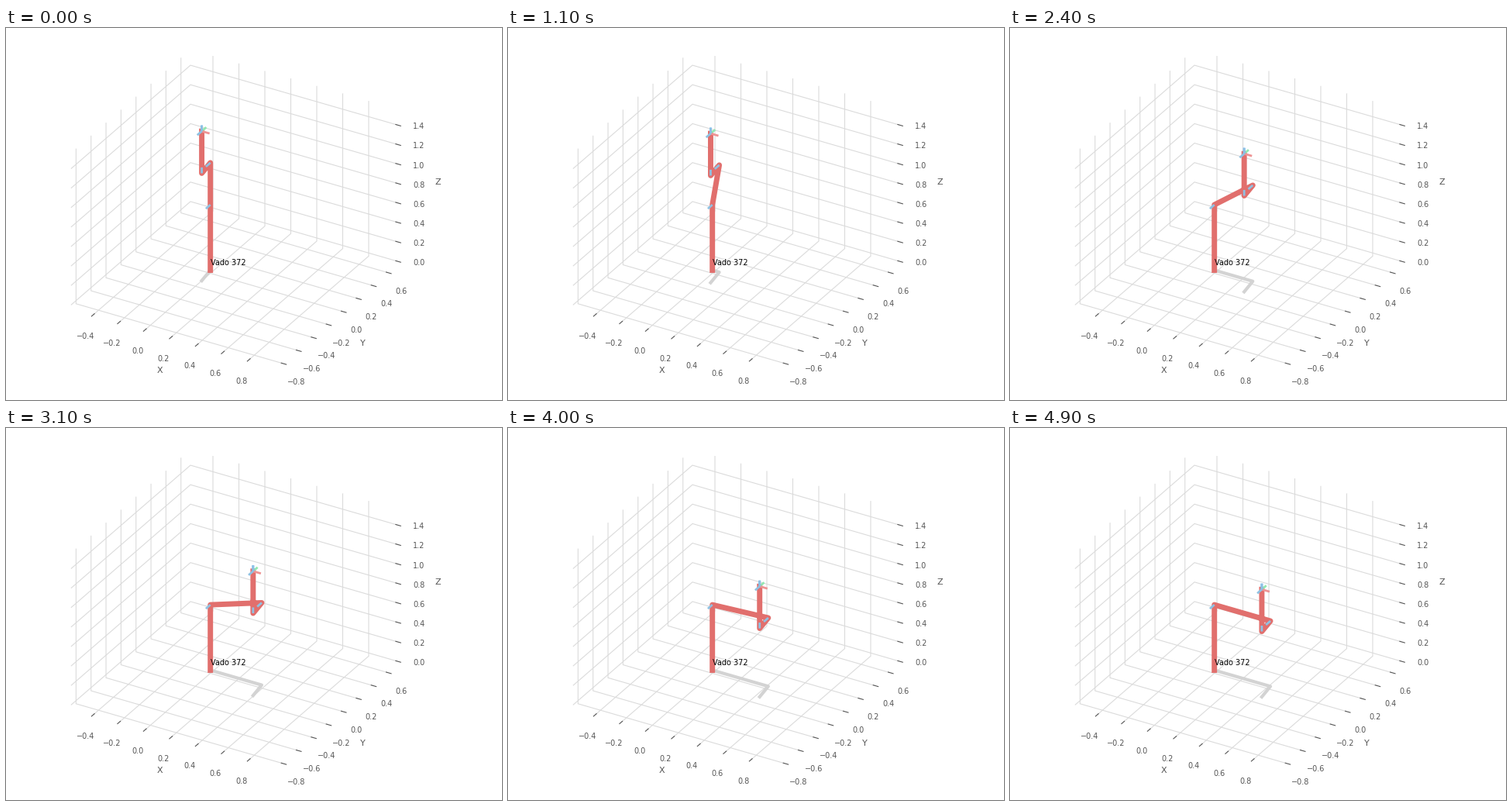
A matplotlib script that plays this animation: 640x480 px, repeating every 5000 ms.

```python
import numpy as np
import matplotlib.pyplot as plt
from matplotlib.animation import FuncAnimation

WIDTH, HEIGHT, DPI = 640, 480, 100
FRAMES, INTERVAL = 50, 100

# Orthographic view at elevation 30, azimuth -60; box aspect 4:4:3
SCALE = 193.4
ORIGIN = np.array([263.7, 312.5])
SIN60 = np.sqrt(3) / 2
VIEW = SCALE * np.array([[SIN60, 0.25], [0.5, -SIN60 / 2], [0, -0.75 * SIN60]])

# Edges of the panes
X0, X1 = -0.573, 1.021
Y0, Y1 = -0.867, 0.727
Z0, Z1 = -0.032, 1.562
TICK_IN, TICK_OUT = 0.0128, 0.0255
LABEL_GAP = 0.1045  # outward, in world units
LABEL_DROP = 8.9  # from the label's anchor to its baseline, in pixels

X_TICKS = np.arange(-2, 5) / 5
Y_TICKS = np.arange(-4, 4) / 5
Z_TICKS = np.arange(0, 8) / 5

# Arm dimensions
D1, A2, D3, A3, D4 = 0.6718, 0.4318, 0.15005, 0.0203, 0.4318
AXIS_LENGTH = 0.06

GREY, GRID = "#555555", "#dbdbdb"
ARM, SHADOW, JOINT = "#E16F6D", "lightgrey", "#8FC1E2"
RED, GREEN, BLUE = "#EE9494", "#93E7B0", "#54AEFF"

plt.rcParams["font.family"] = "DejaVu Sans"
plt.rcParams["font.size"] = 7
fig = plt.figure(figsize=(WIDTH / DPI, HEIGHT / DPI), dpi=DPI, facecolor="white")
ax = fig.add_axes([0, 0, 1, 1])
ax.set_xlim(0, WIDTH)
ax.set_ylim(HEIGHT, 0)
ax.axis("off")


def project(points):
    return ORIGIN + np.asarray(points, float) @ VIEW


def polyline(points, color, width, zorder, **style):
    x, y = project(points).T
    return ax.plot(x, y, color=color, lw=width, zorder=zorder, snap=False, **style)[0]


def centred_text(x, baseline, text, size=7):
    ax.text(x, baseline, text, ha="center", va="baseline", color=GREY, fontsize=size)


def tick_label(edge, outward, value):
    x, y = project(np.array(edge) + LABEL_GAP * np.array(outward))
    centred_text(x, y + LABEL_DROP, f"{value:.1f}".replace("-", "\u2212"))


def grid_line(points):
    polyline(points, GRID, 0.8, 0, solid_capstyle="butt")


def tick_mark(start, end):
    polyline([start, end], GREY, 0.8, 1)


def draw_axes():
    for x in X_TICKS:
        grid_line([(x, Y0, Z0), (x, Y1, Z0), (x, Y1, Z1)])
        tick_mark((x, Y0 - TICK_OUT, Z0), (x, Y0 + TICK_IN, Z0))
        tick_label((x, Y0, Z0), (0, -1, -1), x)
    for y in Y_TICKS:
        grid_line([(X1, y, Z0), (X0, y, Z0), (X0, y, Z1)])
        tick_mark((X1 - TICK_IN, y, Z0), (X1 + TICK_OUT, y, Z0))
        tick_label((X1, y, Z0), (1, 0, -1), y)
    for z in Z_TICKS:
        grid_line([(X0, Y0, z), (X0, Y1, z), (X1, Y1, z)])
        tick_mark((X1 - TICK_IN, Y1, z), (X1 + TICK_OUT, Y1, z))
        tick_label((X1, Y1, z), (1, 1, 0), z)
    centred_text(198.5, 445, "X", 8)
    centred_text(460.5, 410.3, "Y", 8)
    centred_text(557.8, 202, "Z", 8)


def arm_points(angle):
    shoulder = np.array([0, 0, D1])
    elbow = shoulder + A2 * np.array([np.cos(angle), 0, np.sin(angle)])
    forearm = elbow + [A3, -D3, 0]
    wrist = forearm + [0, 0, D4]
    return np.array([np.zeros(3), shoulder, elbow, forearm, wrist])


draw_axes()
start = arm_points(np.pi / 2)
shadow = polyline(start * [1, 1, 0], SHADOW, 3, 2)
arm = polyline(start, ARM, 5, 3)
ax.text(*project((0, 0, 0.05)), "Vado 372", color="black", zorder=4)

# Each short axis: index of its arm point, direction, colour
AXES = [
    (1, (0, -1, 0), JOINT),
    (2, (0, -1, 0), JOINT),
    (3, (0, 0, 1), JOINT),
    (4, (0, 1, 0), GREEN),
    (4, (1, 0, 0), RED),
    (4, (0, 0, 1), BLUE),
    (4, (0, 0, 1), JOINT),
    (4, (0, -1, 0), JOINT),
]
arrows = [
    polyline(np.zeros((2, 3)), color, 2, 5, solid_capstyle="butt")
    for _, _, color in AXES
]


def update(frame):
    t = frame / (FRAMES - 1)
    eased = t**3 * (10 - 15 * t + 6 * t**2)
    points = arm_points(np.pi / 2 * (1 - eased))
    arm.set_data(*project(points).T)
    shadow.set_data(*project(points * [1, 1, 0]).T)
    for arrow, (joint, direction, _) in zip(arrows, AXES):
        base = points[joint]
        tip = base + AXIS_LENGTH * np.array(direction)
        arrow.set_data(*project([base, tip]).T)
    return [shadow, arm, *arrows]


animation = FuncAnimation(fig, update, frames=FRAMES, interval=INTERVAL, repeat=True)
plt.show()
```
